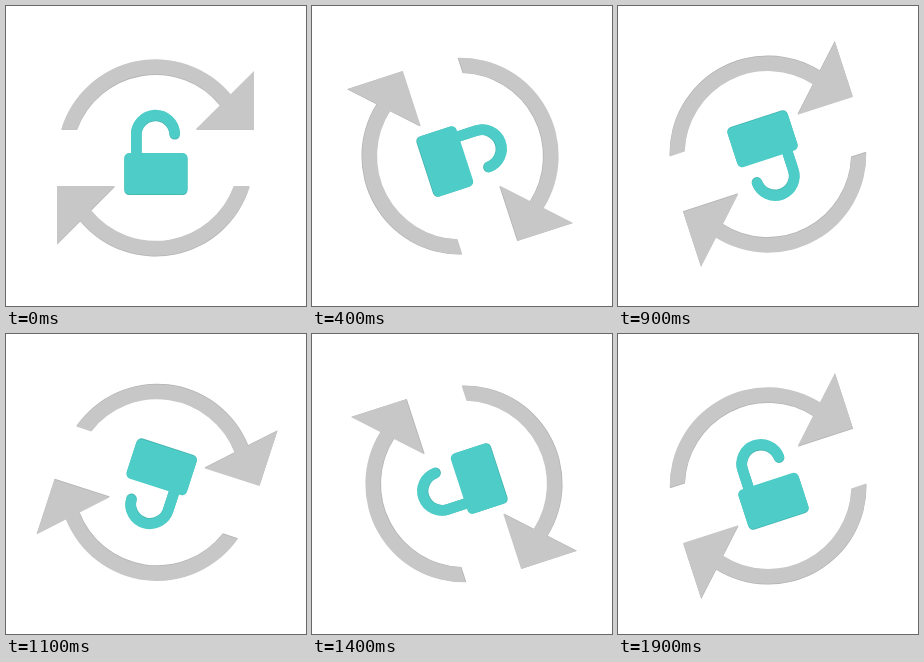
An HTML page for the animation above (2 s loop, 300 px wide and 300 px high).

```html
<!DOCTYPE html>
<html lang="en">
<head>
<meta charset="utf-8">
<title>Rotating lock</title>
<style>
  html, body { margin: 0; width: 100%; height: 100%; overflow: hidden; background: #fff; }
  svg { display: block; width: 100vw; height: 100vh; }
  .arrow { fill: #c7c7c7; }
  .lock { fill: #4ecdc8; stroke: #4ecdc8; }
  .edge .arrow { fill: #b3b3b3; }
  .edge .lock { fill: #43b3af; stroke: #43b3af; }
</style>
</head>
<body>
<svg viewBox="0 0 300 300">
  <defs>
    <path id="arrow" d="M55.4 123A98.3 98.3 0 0 1 224.7 88.3L248 65V123H190L214.1 98.9A83.3 83.3 0 0 0 71.2 123Z"/>
    <g id="lock">
      <rect x="118.3" y="147" width="63.2" height="41.3" rx="5" stroke="none"/>
      <path d="M130.3 150V129.2a19.2 19.2 0 0 1 38.4 -1.7" fill="none" stroke-width="10.6" stroke-linecap="round"/>
    </g>
  </defs>
  <g id="spinner">
    <!-- A thin darker rim under the lower edges -->
    <g class="edge" transform="translate(0 .8)">
      <use class="arrow" href="#arrow"/>
      <use class="arrow" href="#arrow" transform="rotate(180 149.5 151.5)"/>
      <use class="lock" href="#lock"/>
    </g>
    <use class="arrow" href="#arrow"/>
    <use class="arrow" href="#arrow" transform="rotate(180 149.5 151.5)"/>
    <use class="lock" href="#lock"/>
  </g>
</svg>
<script>
  const STEP_MS = 100;
  const STEPS = 20;
  const spinner = document.getElementById('spinner');

  function draw() {
    const step = Math.floor(performance.now() / STEP_MS) % STEPS;
    spinner.setAttribute('transform', `rotate(${step * 360 / STEPS} 150 150)`);
    requestAnimationFrame(draw);
  }
  draw();
</script>
</body>
</html>
```
